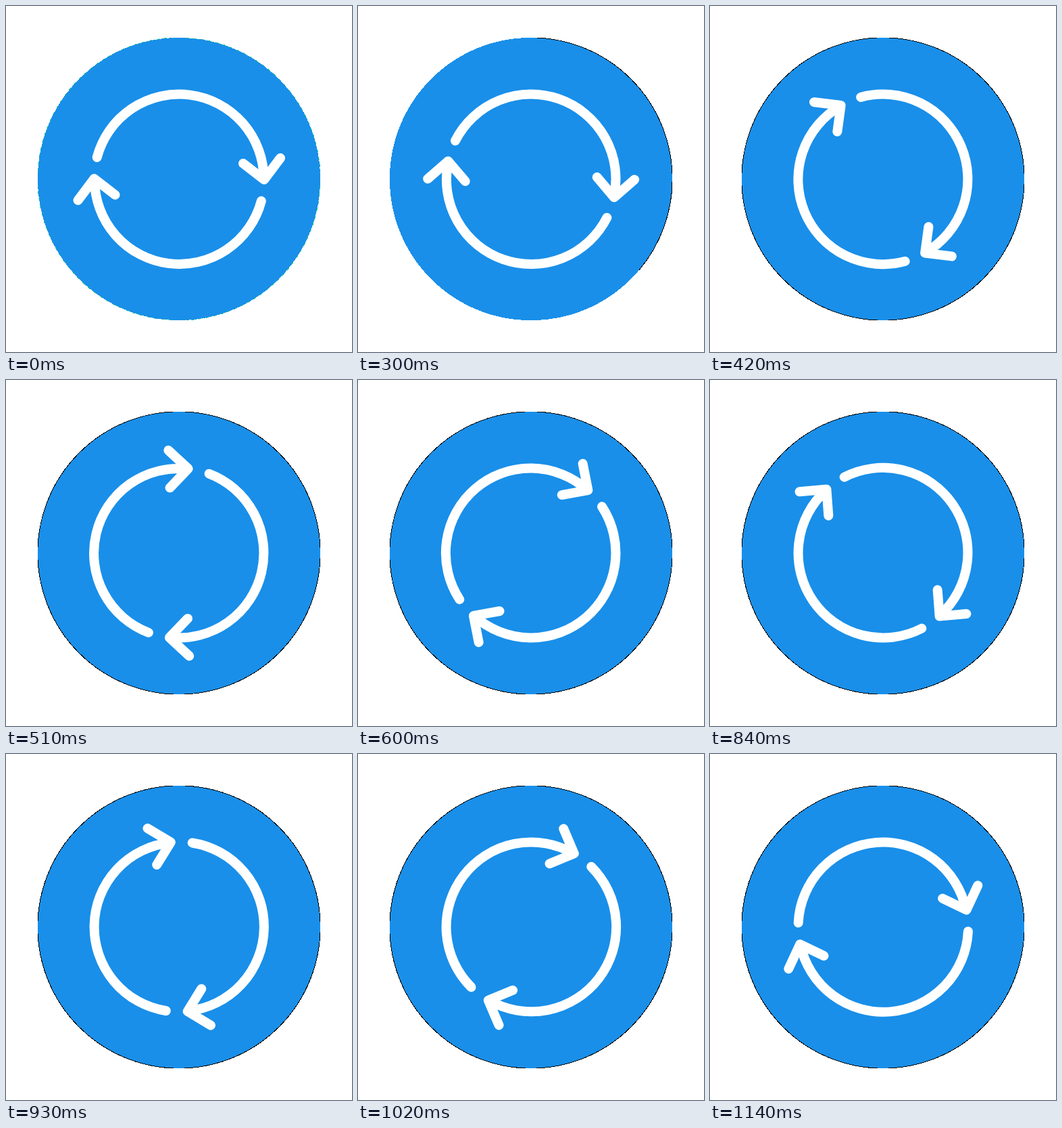
These frames come from a looping animation (512 by 512 pixels, 1170 ms). An HTML page:

```html
<!DOCTYPE html>
<html lang="en">
<head>
<meta charset="utf-8">
<title>Refresh</title>
<style>
  html, body { margin: 0; height: 100%; overflow: hidden; background: #fff; }
  svg { display: block; width: 100vw; height: 100vh; }
  #rim { fill: none; stroke-width: 1; }
  #spin { fill: none; stroke: #fff; stroke-width: 14; stroke-linecap: round; stroke-linejoin: round; }
</style>
</head>
<body>
<svg viewBox="-256 -256 512 512">
  <clipPath id="box"><rect x="-209" y="-209" width="418" height="418"/></clipPath>
  <g clip-path="url(#box)" shape-rendering="crispEdges">
    <circle r="209.2" fill="#198fe9"/>
    <circle id="rim" r="209.2" pathLength="360"/>
  </g>
  <g id="spin">
    <path id="arrow" d="M-121.3-32.1A125.5 125.5 0 0 1 125.5 0M95-23L126 1L150-31"/>
    <use href="#arrow" transform="translate(.5 .5) rotate(180)"/>
  </g>
</svg>
<script>
  const HOLD = 300, STEP = 30, STEPS = 29, LOOP = HOLD + STEP * STEPS;
  const rim = document.getElementById('rim');
  const spin = document.getElementById('spin');

  // The edge is a broken green at rest, dark on one side at first, then dark all round.
  function drawRim(n) {
    rim.setAttribute('stroke', n ? '#000' : '#1fc48a');
    rim.setAttribute('stroke-dasharray', n === 0 ? '1 2' : n === 1 ? '40 230 90 0' : 'none');
  }

  function draw() {
    const t = performance.now() % LOOP;
    const n = t < HOLD ? 0 : Math.floor((t - HOLD) / STEP) + 1;
    spin.setAttribute('transform', `rotate(${n * 360 / (STEPS + 1)})`);
    drawRim(n);
    requestAnimationFrame(draw);
  }
  draw();
</script>
</body>
</html>
```
